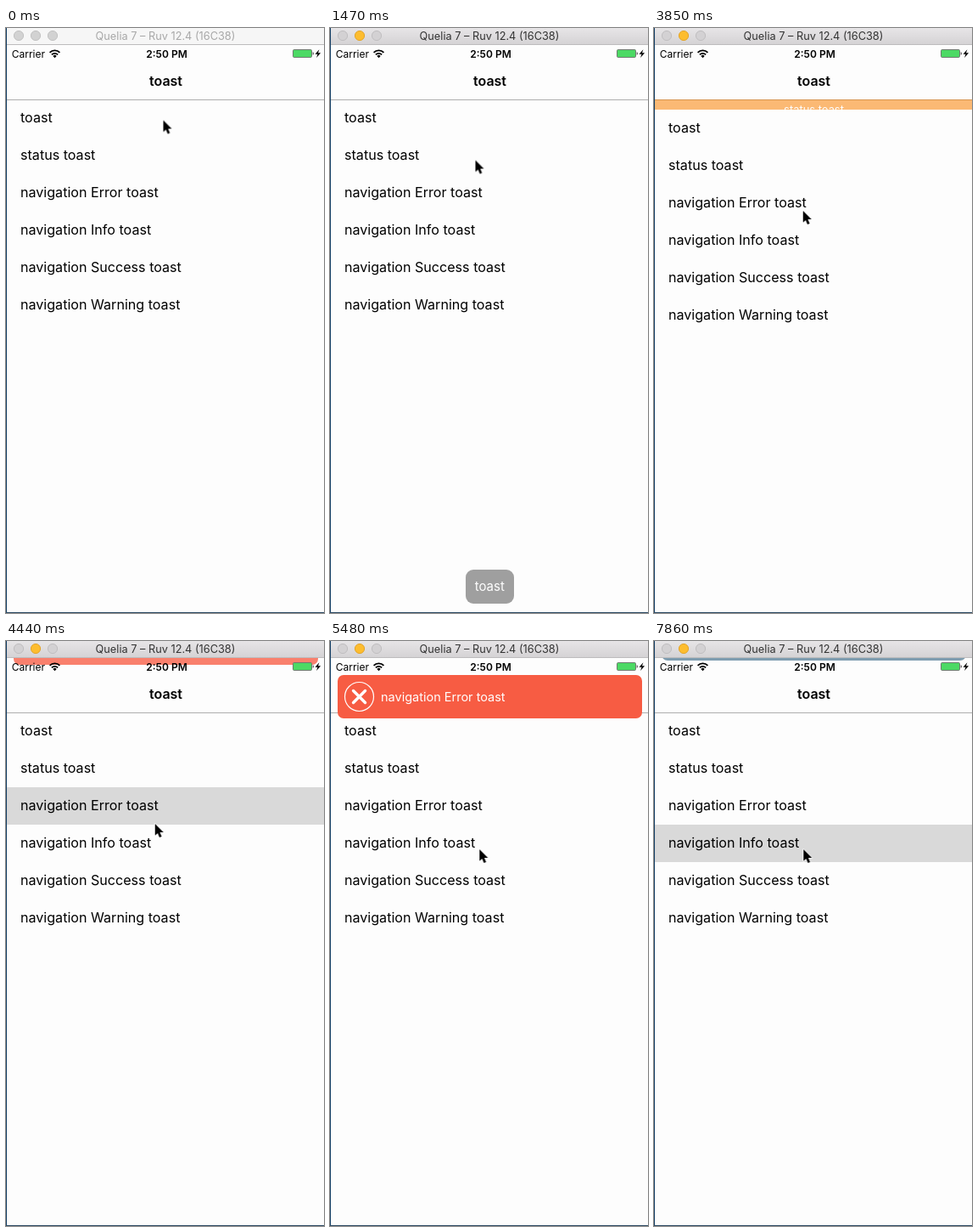
Write an HTML page that moves like this. It is 375 px wide and 688 px high and loops after 8 s.

```html
<!DOCTYPE html>
<html lang="en">
<head>
<meta charset="utf-8">
<title>Toast demo</title>
<style>
  html, body { margin: 0; width: 100%; height: 100%; overflow: hidden; background: #fdfdfd; }
  svg { display: block; width: 375px; height: 688px; font-family: Inter, Roboto, sans-serif; }
  text { white-space: pre; }
  .mid { text-anchor: middle; }
  .semi { font-weight: 600; }
  .white { fill: #fff; }
  .rows { font-size: 16.1px; }

  .active, .list, .press, .banner, .toast, .error, .info, .cursor {
    animation: 8s step-end infinite;
  }
  .active { animation-name: active; }
  .list   { animation-name: list; }
  .press  { animation-name: press; }
  .banner { animation-name: banner; }
  .toast  { animation-name: toast; }
  .error  { animation-name: error; }
  .info   { animation-name: info; }
  .cursor { animation-name: cursor; }

  @keyframes active {
    0% { opacity: 0; }
    1.75%, 100% { opacity: 1; }
  }

  /* highlight of the pressed row */
  @keyframes press {
    0%      { transform: translateY(0); opacity: 0; }
    3.625%  { transform: translateY(0); opacity: 1; }
    5.375%  { transform: translateY(0); opacity: .38; }
    7.25%   { transform: translateY(0); opacity: 0; }
    23.875% { transform: translateY(44px); opacity: 1; }
    25.75%  { transform: translateY(44px); opacity: .9; }
    27.5%   { transform: translateY(44px); opacity: .36; }
    29.375% { transform: translateY(44px); opacity: 0; }
    55.5%   { transform: translateY(88px); opacity: 1; }
    57.375% { transform: translateY(88px); opacity: .9; }
    59.25%  { transform: translateY(88px); opacity: .36; }
    61.125% { transform: translateY(88px); opacity: 0; }
    96.375%, 100% { transform: translateY(132px); opacity: 1; }
  }

  @keyframes list {
    0%, 23.875% { transform: translateY(0); }
    25.75%  { transform: translateY(20px); }
    27.5%   { transform: translateY(25px); }
    48.125% { transform: translateY(12px); }
    50%, 100% { transform: translateY(0); }
  }

  @keyframes banner {
    0%      { transform: translateY(-25px); opacity: 0; clip-path: inset(0); }
    23.875% { transform: translateY(-25px); opacity: .3; clip-path: inset(0); }
    25.75%  { transform: translateY(-5px); opacity: .85; clip-path: inset(0); }
    27.5%   { transform: translateY(0); opacity: 1; clip-path: inset(0); }
    48.125% { transform: translateY(0); opacity: .55; clip-path: inset(0 0 13px 0); }
    50%, 100% { transform: translateY(-25px); opacity: 0; clip-path: inset(0); }
  }

  @keyframes toast {
    0%      { opacity: 0; }
    3.625%  { opacity: .35; }
    5.375%  { opacity: 1; }
    18.375% { opacity: .53; }
    20.25%, 100% { opacity: 0; }
  }

  @keyframes error {
    0%      { transform: translateY(-80px); opacity: .7; }
    55.5%   { transform: translateY(-63px); opacity: .78; }
    57.375% { transform: translateY(-14px); opacity: .95; }
    59.25%  { transform: translateY(0); opacity: 1; }
    92.75%  { transform: translateY(-2px); opacity: 1; }
    94.625% { transform: translateY(-40px); opacity: .85; }
    96.375%, 100% { transform: translateY(-80px); opacity: .7; }
  }

  @keyframes info {
    0%    { transform: translateY(-80px); }
    98.25%, 100% { transform: translateY(-68px); }
  }

  @keyframes cursor {
    0%      { transform: translate(185.5px, 108.5px); }
    7.25%   { transform: translate(183px, 119px); }
    9.125%  { transform: translate(175px, 144px); }
    10.875% { transform: translate(171.5px, 155.5px); }
    31.25%  { transform: translate(172.5px, 169px); }
    33.125% { transform: translate(174.5px, 194px); }
    35%     { transform: translate(175.5px, 210px); }
    36.875% { transform: translate(175.7px, 215px); }
    63%     { transform: translate(175.8px, 220px); }
    64.875% { transform: translate(176px, 232px); }
    66.625% { transform: translate(176.3px, 242px); }
    68.5%, 100% { transform: translate(176.3px, 245px); }
  }
</style>
</head>
<body>
<svg viewBox="0 0 375 688">
  <defs>
    <linearGradient id="chrome" x2="0" y2="1">
      <stop offset="0" stop-color="#e7e5e7"/>
      <stop offset="1" stop-color="#d4d2d4"/>
    </linearGradient>
    <clipPath id="screen"><rect x="1" y="20" width="374" height="667"/></clipPath>
  </defs>
  <rect width="375" height="688" fill="#fdfdfd"/>

  <g clip-path="url(#screen)">
    <!-- navigation bar -->
    <rect x="1" y="84" width="374" height="1" fill="#adadad"/>

    <g class="list rows">
      <rect class="press" x="1" y="84" width="374" height="44" fill="#d9d9d9"/>
      <text x="17" y="111">toast</text>
      <text x="17" y="155">status toast</text>
      <text x="17" y="199">navigation Error toast</text>
      <text x="17" y="243">navigation Info toast</text>
      <text x="17" y="287">navigation Success toast</text>
      <text x="17" y="331">navigation Warning toast</text>
    </g>

    <g class="banner">
      <rect x="1" y="84" width="374" height="25" fill="#fa8205"/>
      <text class="mid white" x="188.5" y="101" font-size="12.9">status toast</text>
    </g>
    <text class="mid semi" x="188.5" y="68" font-size="16">toast</text>

    <g class="toast">
      <rect x="160" y="637" width="57" height="40" rx="9" fill="#000" fill-opacity=".7"/>
      <text class="mid white" x="188.3" y="662" font-size="15">toast</text>
    </g>

    <!-- sliding notices -->
    <g class="error">
      <rect x="9" y="40" width="359" height="51" rx="7" fill="#f75c43"/>
      <g fill="none" stroke="#fff">
        <circle cx="34.5" cy="65.5" r="17" stroke-width="1.2"/>
        <path d="M27.5 58.5l14 14m0-14l-14 14" stroke-width="3.4" stroke-linecap="round"/>
      </g>
      <text class="white" x="60" y="71" font-size="14.5">navigation Error toast</text>
    </g>
    <rect class="info" x="9" y="40" width="359" height="51" rx="7" fill="#7f9db0"/>

    <!-- status bar -->
    <text x="6.7" y="35" font-size="12">Carrier</text>
    <g fill="none" stroke="#000" stroke-width="1.8">
      <path d="M51.6 28.9a8 8 0 0 1 11.8 0"/>
      <path d="M53.9 31.4a5 5 0 0 1 7.2 0"/>
    </g>
    <path d="M57.5 35.2l-2.1-2.3a3 3 0 0 1 4.2 0z"/>
    <text class="mid semi" x="189.5" y="34.5" font-size="12">2:50 PM</text>
    <rect x="338.5" y="25.5" width="22" height="9" rx="1.2" fill="#4cd964" stroke="#6f7a70"/>
    <path d="M361.6 28.2q1.5.3 1.5 1.8t-1.5 1.8z" fill="#666"/>
    <path d="M369.4 25.2l-4.9 5.6h3l-1.4 4.2 5-5.7h-3.1z"/>
  </g>

  <!-- window chrome -->
  <rect width="375" height="20" fill="#f6f6f6"/>
  <g fill="#d2d2d2" stroke="#c2c2c2">
    <circle cx="15" cy="9" r="5.6"/>
    <circle cx="35" cy="9" r="5.6"/>
    <circle cx="55" cy="9" r="5.6"/>
  </g>
  <text class="mid" x="188" y="14" font-size="12.75" fill="#a8a8a8">Quelia 7 – Ruv 12.4 (16C38)</text>
  <g class="active">
    <rect width="375" height="20" fill="url(#chrome)"/>
    <g fill="#d3d1d3" stroke="#c0bec0">
      <circle cx="15" cy="9" r="5.6"/>
      <circle cx="35" cy="9" r="5.6" fill="#fdbd2f" stroke="#e3a52a"/>
      <circle cx="55" cy="9" r="5.6"/>
    </g>
    <text class="mid" x="188" y="14" font-size="12.75" fill="#333">Quelia 7 – Ruv 12.4 (16C38)</text>
  </g>
  <rect y="19" width="375" height="1" fill="#bdbcbd"/>
  <rect width="1" height="688" fill="#143f66"/>
  <rect y="687" width="375" height="1" fill="#2c4a64"/>

  <path class="cursor" d="M0 0V13.8L3.1 10.9L5.2 16L7.8 14.9L5.7 10H10Z"
        stroke="#fff" stroke-width="1.6" stroke-linejoin="round" paint-order="stroke"/>
</svg>
</body>
</html>
```
